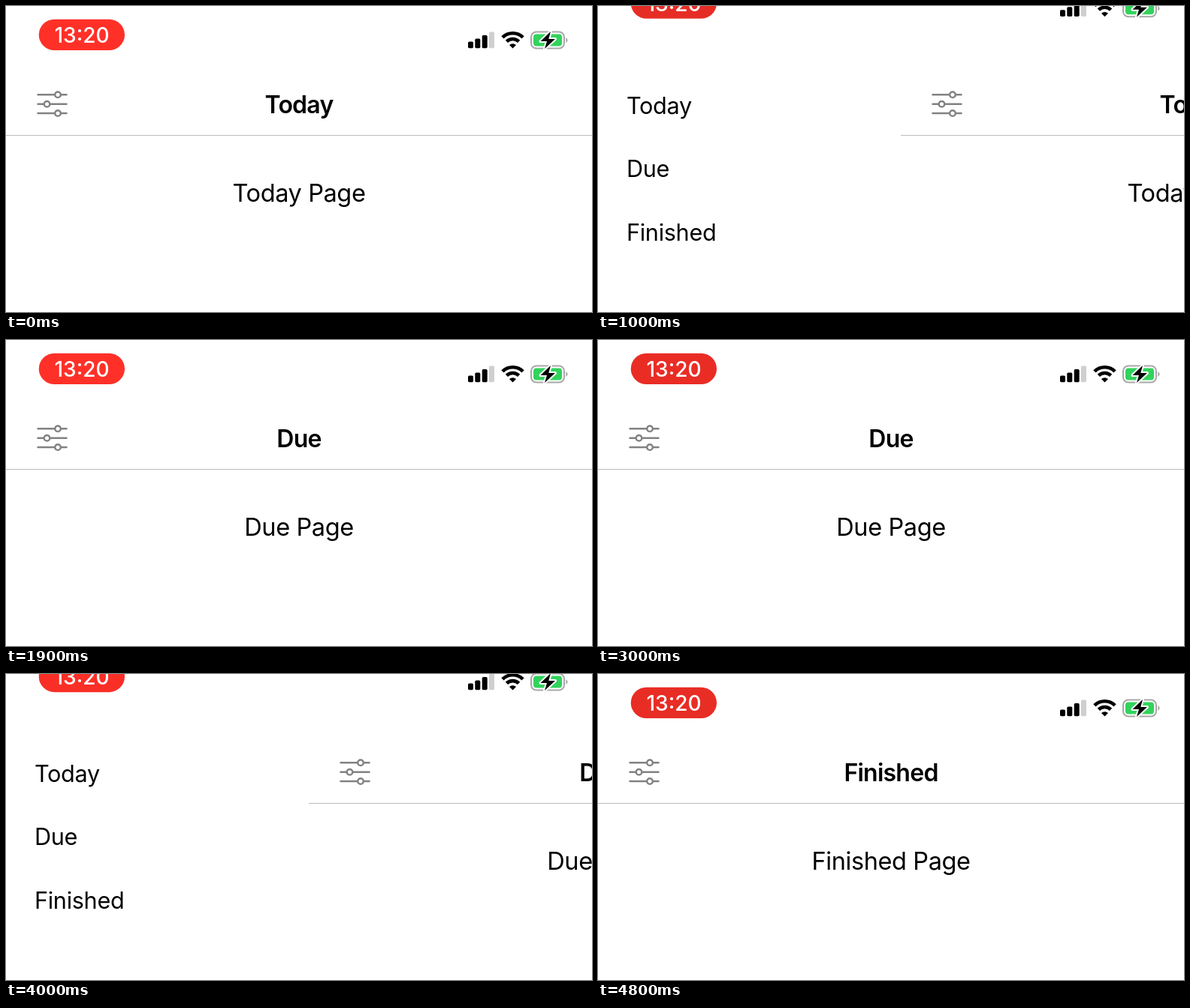
An HTML page that plays this animation: 780x408 px, repeating every 5.8 s.

```html
<!DOCTYPE html>
<html lang="en">
<head>
<meta charset="utf-8">
<title>Drawer menu</title>
<style>
  html, body { margin: 0; width: 100%; height: 100%; overflow: hidden; background: #fff; }
  svg { display: block; width: 780px; height: 408px; font-family: Inter, "Noto Sans", sans-serif; }
  #menu text { font-size: 30.6px; letter-spacing: -.3px; }
  #title { font-size: 32px; font-weight: 600; letter-spacing: -.75px; }
  #body { font-size: 32.5px; letter-spacing: -.4px; }
  #title, #body, #clock { text-anchor: middle; }
  #clock { font-size: 28px; font-weight: 500; fill: #fff; }
  #icon { fill: #fff; stroke: #828282; stroke-width: 2.5; stroke-linecap: round; }
</style>
</head>
<body>
<svg viewBox="0 0 780 408">
  <rect id="row" width="780" height="84.7" fill="#dedede"/>
  <g id="menu">
    <text y="143.5">Today</text>
    <text y="228.3">Due</text>
    <text y="313">Finished</text>
  </g>
  <g id="page">
    <rect width="780" height="408" fill="#fff"/>
    <path d="M0 172.5H780" stroke="#bcbcbc"/>
    <g id="icon">
      <path d="M42.5 118.3H80.5M42.5 130.7H80.5M42.5 143H80.5"/>
      <circle cx="69" cy="118.3" r="3.8"/>
      <circle cx="54.5" cy="130.7" r="3.8"/>
      <circle cx="69" cy="143" r="3.8"/>
    </g>
    <text id="title" x="390" y="142.5"></text>
    <text id="body" x="390" y="261"></text>
  </g>
  <g id="status">
    <rect id="pill" x="43.7" y="17.7" width="114.3" height="41.4" rx="20.7"/>
    <text id="clock" x="101" y="49">13:20</text>
    <rect x="615" y="47.5" width="7" height="8.7" rx="1.7"/>
    <rect x="624.3" y="43.5" width="7" height="12.7" rx="1.7"/>
    <rect x="633.7" y="39" width="7" height="17.2" rx="1.7"/>
    <rect x="643" y="34.5" width="7" height="21.7" rx="1.7" fill="#cfcfcf"/>
    <g fill="none" stroke="#000" stroke-width="4.6">
      <path d="M660.9 41.9A19.2 19.2 0 0 1 688.1 41.9"/>
      <path d="M666.4 47.4A11.5 11.5 0 0 1 682.6 47.4"/>
    </g>
    <path d="M674.5 56.5L670 52A6.4 6.4 0 0 1 679 52Z"/>
    <rect x="699" y="34.5" width="44" height="22" rx="7" fill="none" stroke="#a8a8a8" stroke-width="2"/>
    <path d="M745.3 42Q750 45.5 745.3 49Z" fill="#a8a8a8"/>
    <rect x="702" y="37.5" width="38" height="16" rx="4" fill="#32d35c"/>
    <path d="M725 34L711.5 47H720L717 57L731 44H722.3Z" stroke="#fff" stroke-width="4" paint-order="stroke" stroke-linejoin="round"/>
  </g>
</svg>
<script>
const LOOP = 5800, REST = 4800, STEP = 100;
const WIDTH = 403, SLIDE = 433, PULSE = 1850;
const names = ["Today", "Due", "Finished"];
const visits = [{ open: 500, close: 1389 }, { open: 3526, close: 4311 }];

const $ = id => document.getElementById(id);
const ramp = (t, start, length) => Math.max(0, Math.min(1, (t - start) / length));
const easeOut = p => 1 - (1 - p) ** 3;
const mix = (a, b, p) => Math.round(a + (b - a) * p);

function draw(t) {
  const visit = t < 3200 ? 0 : 1;
  const { open, close } = visits[visit];
  const closing = t >= close;
  const shown = easeOut(ramp(t, open, SLIDE)) - easeOut(ramp(t, close, SLIDE));
  const left = WIDTH * shown;

  // The menu settles slightly before the page while opening.
  const menuX = closing ? left - 365 : Math.min(38, left - 340);
  $("menu").setAttribute("transform", `translate(${menuX})`);
  $("page").setAttribute("transform", `translate(${left})`);

  const name = names[visit + closing];
  $("title").textContent = name;
  $("body").textContent = name + " Page";

  $("row").setAttribute("y", 174.2 + 84.7 * visit);
  $("row").setAttribute("visibility", t >= close - 100 ? "visible" : "hidden");

  const hidden = ramp(t, open + 350, 220) - ramp(t, close + 200, 220);
  $("status").setAttribute("transform", `translate(0 ${-62 * hidden})`);

  const dim = .5 - .5 * Math.cos(2 * Math.PI * t / PULSE);
  $("pill").setAttribute("fill", `rgb(${mix(255, 230, dim)},${mix(48, 45, dim)},${mix(40, 37, dim)})`);
}

const begin = performance.now();
function frame() {
  const t = (performance.now() - begin) % LOOP;
  draw(Math.min(REST, Math.floor(t / STEP) * STEP));
  requestAnimationFrame(frame);
}
frame();
</script>
</body>
</html>
```
